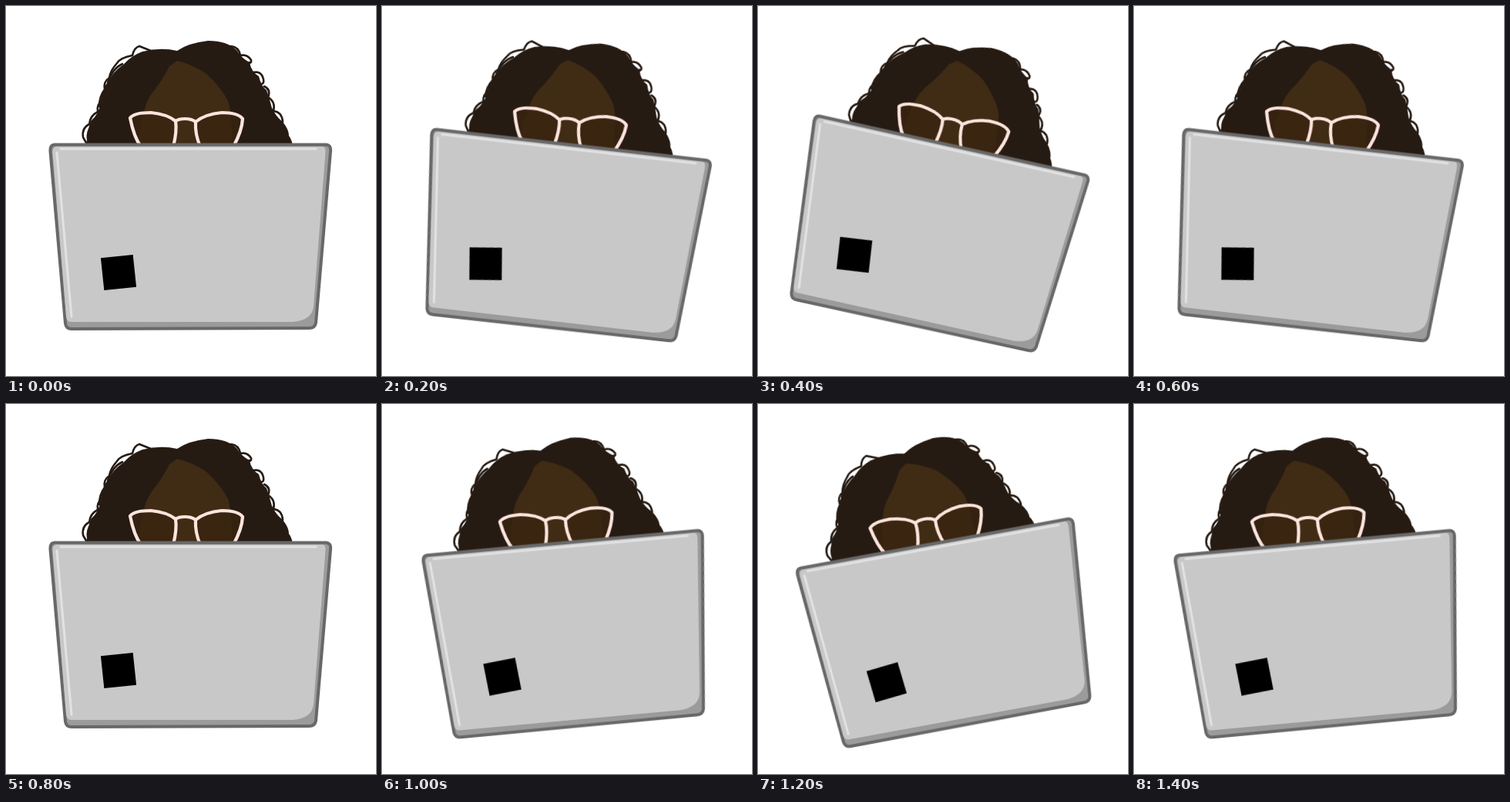
Write an HTML page without scripts that moves like this. It is 480 by 479 pixels and loops after 1600 ms.

```html
<!DOCTYPE html>
<html lang="en">
<head>
<meta charset="utf-8">
<title>Behind the laptop</title>
<style>
  html, body { margin: 0; width: 100%; height: 100%; overflow: hidden; background: #fff; }
  svg { display: block; width: 100%; height: 100%; }
  .sway { transform-origin: 240px 238px; animation: sway 1.6s step-end infinite; }
  @keyframes sway {
    0%, 50%, 100% { transform: rotate(0deg); }
    12.5%, 37.5% { transform: rotate(6.5deg); }
    25% { transform: rotate(12.5deg); }
    62.5%, 87.5% { transform: rotate(-5.2deg); }
    75% { transform: rotate(-10.4deg); }
  }
  .line { fill: none; stroke-linecap: round; stroke-linejoin: round; }
  .curls { stroke: #261b13; stroke-width: 2.6; }
  .frame { stroke: #fde4dd; stroke-width: 4.2; }
  .shine { stroke: #e2e2e2; stroke-width: 3; }
</style>
</head>
<body>
<svg viewBox="0 0 480 479">
  <g class="sway">
    <!-- hair -->
    <path fill="#261b13" d="M104 186 Q105 162 110 149 Q121 139 122 127 Q125 106 133 97 Q139 85 152 76 Q163 64 177 59 Q201 53 222 58 Q236 48 262 45 Q287 45 299 57 Q306 68 316 73 Q318 85 328 91 Q331 104 338 109 Q342 120 345 132 Q350 143 359 150 Q367 160 367 168 Q372 174 372 186Z"/>
    <g class="line curls">
      <path d="M188 58 L173 52 Q166 54 164 64 Q148 67 144 74 Q135 84 134 93 Q126 98 128 108 Q121 117 121 130"/>
      <path d="M151 75 Q138 81 132 99 M126 120 Q117 128 119 137 Q109 142 108 153 Q98 158 100 170 L104 177 M110 156 Q105 163 106 172"/>
      <path d="M292 52 Q302 53 304 64 Q313 62 318 70 Q319 75 312 74 M316 73 Q309 82 318 87 Q331 82 334 95 Q335 101 331 101 M335 104 Q344 108 340 118 Q350 124 347 136 Q358 137 359 150"/>
    </g>

    <!-- face -->
    <path fill="#402b15" d="M222 71 Q240 75 259 87 Q279 105 288 123 Q293 136 294 186 H172 Q172 157 179 137 Q182 121 194 107 Q204 94 212 78Z"/>

    <!-- glasses -->
    <g class="line frame">
      <path fill="#38240f" fill-opacity=".8" d="M175 182 Q166 170 161 145 Q166 138 188 138 Q209 140 220 149 Q222 162 217 182"/>
      <path fill="#38240f" fill-opacity=".8" d="M252 182 Q245 166 246 150 Q258 140 280 138 Q301 138 307 146 Q306 162 295 182"/>
      <path d="M220 149 Q224 146 232 146 Q241 146 246 150"/>
    </g>

    <!-- laptop -->
    <path fill="#9b9b9b" stroke="#686868" stroke-width="4" stroke-linejoin="round" d="M63 179.500 H415 Q422 180 421 188 L402 410 Q401 417 393 417 L85 418 Q78 418 77 411 L57.500 188 Q57 180 63 179.500Z"/>
    <path fill="#c8c8c8" d="M65 182 H411 Q415 183 414.500 189 L399 389 Q397 407 372 409 L84 409 Q79 409 78 402 L60.500 190 Q60 183 65 182Z"/>
    <path class="line shine" d="M71 185 H402 M66 190 L85 402"/>

    <!-- lid badge -->
    <rect x="125" y="324" width="42" height="42" transform="rotate(-6 146 345)"/>
  </g>
</svg>
</body>
</html>
```
